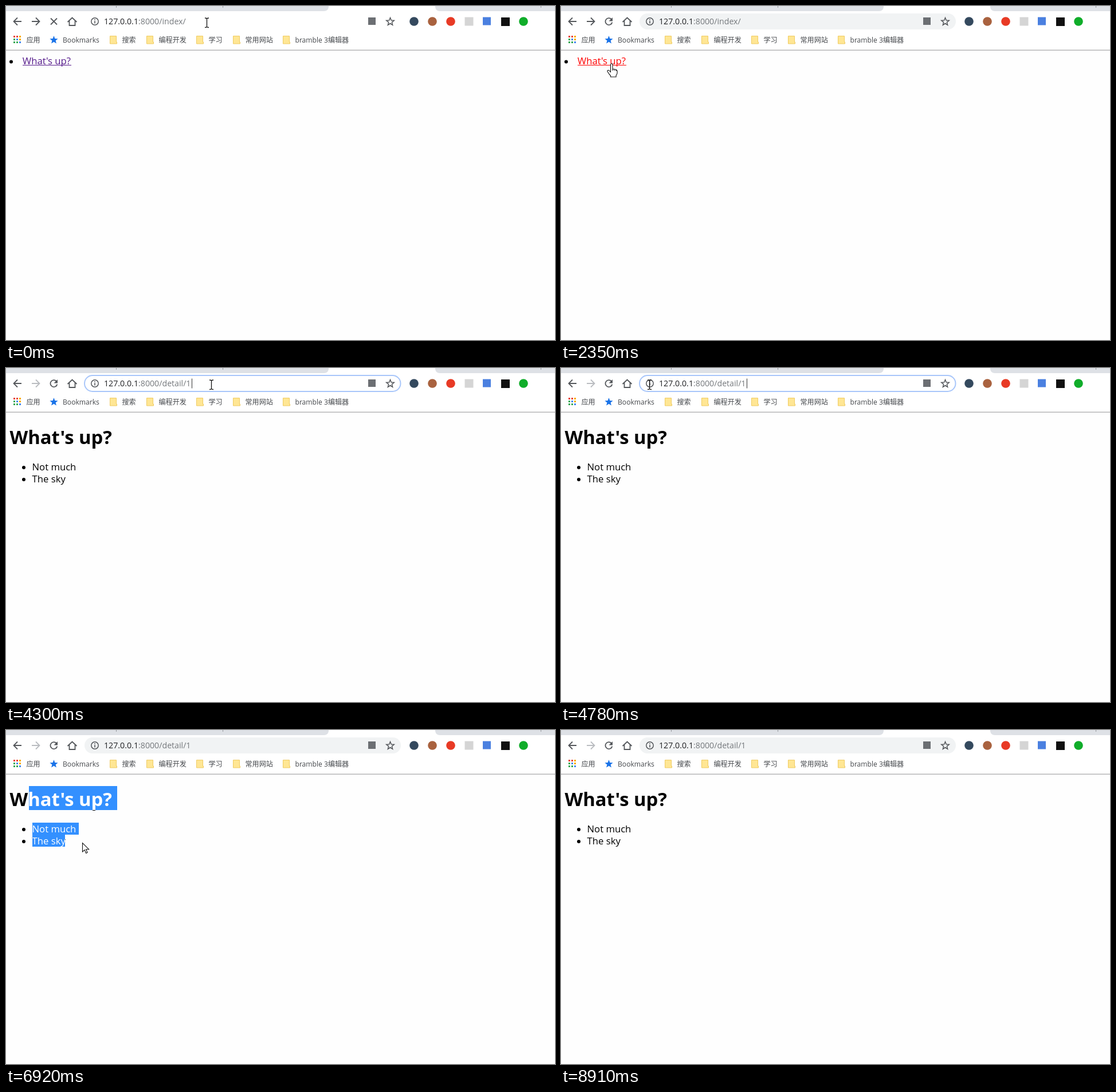
These frames come from a looping animation (958x584 px, 9750 ms). An HTML page:

```html
<!DOCTYPE html>
<html lang="zh-CN">
<head>
<meta charset="utf-8">
<style>
html, body { margin: 0; width: 100%; height: 100%; overflow: hidden; background: #fefefe; }
svg { display: block; font-family: "Open Sans", "Noto Sans CJK SC", "Noto Sans CJK", sans-serif; }
.bar { font-size: 12.1px; fill: #45484c; }
.url { font-size: 14.2px; fill: #202124; }
.url .path { fill: #74787c; }
.body { font-size: 16.7px; }
.title { font-size: 32.8px; font-weight: 700; }
.line { fill: none; stroke: #54575b; stroke-width: 1.8; }
.cursor { fill: #fff; stroke: #111; stroke-width: 1.1; }
</style>
</head>
<body>
<svg width="958" height="584" viewBox="0 0 958 584">
  <defs>
    <clipPath id="picked"><rect/><rect/><rect/></clipPath>
    <g id="words">
      <text class="title" x="6.5" y="132.7">What's up?</text>
      <text class="body" x="45.5" y="179">Not much</text>
      <text class="body" x="45.5" y="200">The sky</text>
    </g>
  </defs>

  <rect width="958" height="77" fill="#fff"/>
  <path fill="#dee1e6" d="M0 0H563V2Q562 9 555 9H0zM749 0H958V9H757Q750 9 749 2z"/>
  <path stroke="#96999e" d="M192.5 0V3M378.5 0V3M933.5 0V3"/>
  <path stroke="#b5b5b7" stroke-width="1.4" d="M0 77.2H958"/>

  <rect id="box" x="137" y="13" width="552" height="28" rx="14"/>
  <rect id="pale" x="137" y="20" width="509" height="21" fill="#fefefe"/>
  <rect id="ring" x="137" y="13" width="551.5" height="28" rx="14" fill="#fff" stroke="#a8c6fa" stroke-width="2"/>

  <g class="line">
    <path d="M27 27H13.5M20 20.5L13.5 27l6.5 6.5"/>
    <path id="forward" d="M45 27H58M52 20.5L58.5 27 52 33.5"/>
    <path id="stop" d="M78 21.5l11 11m0-11l-11 11"/>
    <g id="reload">
      <path d="M88 23.2A6 6 0 1 0 89.3 28.5"/>
      <path d="M90 20v6.5h-6.5z" fill="#54575b" stroke="none"/>
    </g>
    <path d="M107.5 28L115.5 20.5 123.5 28M110.5 26V34h10V26"/>
    <circle cx="155" cy="27" r="6.2" stroke-width="1.5"/>
    <path d="M155 26V30.5M155 23V24.7" stroke-width="1.6"/>
    <path id="outlineStar" stroke-width="1.5"/>
  </g>
  <text class="url" x="171" y="32">127.0.0.1<tspan class="path" id="path"></tspan></text>
  <path id="caret" stroke="#333" d="M324.5 18.5V35.5"/>
  <rect id="translate" x="632" y="20" width="13" height="13" fill="#6c6f73"/>
  <g id="icons"></g>
  <path id="blueStar" fill="#1a73e8"/>

  <g id="index">
    <circle cx="9" cy="97.5" r="3"/>
    <g id="link">
      <text class="body" x="28.7" y="102">What's up?</text>
      <rect x="29" y="103" width="85" height="1"/>
    </g>
  </g>
  <g id="detail">
    <circle cx="31" cy="174" r="3"/><circle cx="31" cy="195" r="3"/>
    <use href="#words"/>
    <g clip-path="url(#picked)">
      <rect y="90" width="300" height="130" fill="#3390ff"/>
      <use href="#words" fill="#fff"/>
    </g>
  </g>

  <g id="pointer">
    <path id="arrow" class="cursor" d="M.5 .5V16l3.6-3.4 2.6 5.8 2.4-1.1-2.5-5.6h5z"/>
    <path id="beam" fill="none" stroke="#111" stroke-width="1.3" d="M-3-7Q.5-7 .5-5.5Q.5-7 4-7M.5-6V9M-3 9.5Q.5 9.5 .5 8Q.5 9.5 4 9.5"/>
    <path id="hand" class="cursor" d="M-1.5 1.5a1.8 1.8 0 0 1 3.6 0V9l5 1q3 .6 3 3.5v2q0 3-2 5V23h-9.5v-2q-3-3-5.5-7.5q-.5-2.2 1.5-2.2q1.5.3 3.9 3zM2.1 9v3M5 9.7v2.5M8 10.5v2"/>
  </g>
</svg>
<script>
const LOOP = 9750;
const $ = id => document.getElementById(id);
const show = (id, on) => $(id).style.display = on ? "" : "none";

const star = (cx, cy, r) => "M" + Array.from({ length: 10 }, (_, i) => {
  const a = i * Math.PI / 5 - Math.PI / 2, q = i % 2 ? r * 0.43 : r;
  return [cx + q * Math.cos(a), cy + q * Math.sin(a)].map(v => v.toFixed(1));
}).join("L") + "z";
$("outlineStar").setAttribute("d", star(670.5, 27.5, 7));
$("blueStar").setAttribute("d", star(83.5, 59.5, 7.5));

// Toolbar buttons, app grid and bookmarks
const rect = (x, y, w, h, fill) => `<rect x="${x}" y="${y}" width="${w}" height="${h}" fill="${fill}"/>`;
const disc = (x, fill) => `<circle cx="${x}" cy="27" r="7.8" fill="${fill}"/>`;
const label = (x, text) => `<text class="bar" x="${x}" y="63.5">${text}</text>`;
const folder = x => `<path d="M${x + .5} 52.5h11v10.5h1v3h-12z" fill="#ffe694" stroke="#efcb62"/>`;
const [red, yellow, green, blue] = ["#ea4335", "#fbaa05", "#34a853", "#4285f4"];
const dots = [red, red, yellow, green, blue, yellow, green, green, blue];

$("icons").innerHTML =
  disc(712, "#34495e") + disc(744, "#a9623f") + disc(776, "#e83a25") +
  rect(800.5, 19.5, 15, 15, "#d5d5d5") + rect(832, 19.5, 14, 14, "#4a80e0") +
  rect(864, 20, 15, 15, "#111") + disc(903, "#10ad2a") +
  dots.map((c, i) => rect(13 + i % 3 * 5, 52 + (i / 3 | 0) * 5, 3, 3, c)).join("") +
  label(35.5, "应用") + label(99, "Bookmarks") +
  [[181, "搜索"], [245, "编程开发"], [332, "学习"], [396, "常用网站"], [483, "bramble 3编辑器"]]
    .map(([x, text]) => folder(x) + label(x + 21.5, text)).join("");

// Pointer moves: first step, last step, number of steps, end point
const moves = [
  [120, 630, 5, 306, 138], [910, 1450, 5, 88, 101],
  [3460, 3730, 3, 241, 39], [3880, 4300, 4, 358, 28],
  [4420, 4420, 1, 285, 28], [4540, 4780, 3, 154, 28],
  [5210, 5630, 4, 301, 129], [5750, 6230, 4, 41, 121],
  [6380, 6920, 5, 133, 197], [7040, 7400, 4, 340, 251],
  [7710, 8130, 4, 297, 142], [8400, 8790, 4, 912, 557]
];

function pointerAt(t) {
  let x = 350, y = 28;
  for (const [from, to, n, endX, endY] of moves) {
    if (t < from) break;
    const step = (to - from) / (n - 1) || 1;
    const p = Math.min(n, Math.floor((t - from) / step) + 1) / n;
    x += (endX - x) * p;
    y += (endY - y) * p;
  }
  return [Math.round(x), Math.round(y)];
}

function pointerKind(t, x, y) {
  const over = (x0, y0, x1, y1) => x >= x0 && x <= x1 && y >= y0 && y <= y1;
  if (over(137, 13, 620, 38)) return "beam";
  if (t < 3460) return over(29, 88, 113, 106) ? "hand" : "arrow";
  return over(7, 98, 184, 140) || over(46, 162, 122, 204) ? "beam" : "arrow";
}

// Selectable lines: left, right, top, bottom, and the reach of the pointer
const lines = [[40, 194, 98, 140, 0, 150], [46, 127, 162, 183, 150, 183], [46, 103, 183, 204, 183, 204]];
const picks = document.querySelectorAll("#picked rect");

function select(on, x, y) {
  lines.forEach(([left, right, top, bottom, start, end], i) => {
    // Past the middle of the last line the whole text is taken
    const edge = y < start ? left : y >= end ? right : Math.max(left, Math.min(right, x));
    const size = { x: left, y: top, width: on ? edge - left : 0, height: bottom - top };
    for (const k in size) picks[i].setAttribute(k, size[k]);
  });
}

function draw(t) {
  const during = (a, b) => t >= a && t < b;
  const loading = t < 120 || during(2470, 3180);
  const focused = during(4300, 5630);
  const [x, y] = pointerAt(t);
  const kind = pointerKind(t, x, y);

  $("box").setAttribute("fill", t < 120 ? "#fff" : "#f1f3f4");
  show("pale", during(2470, 4300));
  show("ring", focused);
  show("caret", focused);
  show("stop", loading);
  show("reload", !loading);
  show("translate", !during(2590, 3180));
  $("forward").style.stroke = t < 2590 ? "" : "#b9bcc0";
  $("path").textContent = t < 2590 ? ":8000/index/" : ":8000/detail/1";

  show("index", t < 3030);
  show("detail", t >= 3030);
  $("link").setAttribute("fill", during(2350, 2470) ? "#f00" : "#551a8b");
  select(during(6380, 7710), x, y);

  show("pointer", t < 8910);
  $("pointer").setAttribute("transform", `translate(${x} ${y})`);
  for (const id of ["arrow", "beam", "hand"]) show(id, id === kind);
}

const start = performance.now();
(function tick() {
  draw((performance.now() - start) % LOOP);
  requestAnimationFrame(tick);
})();
</script>
</body>
</html>
```
